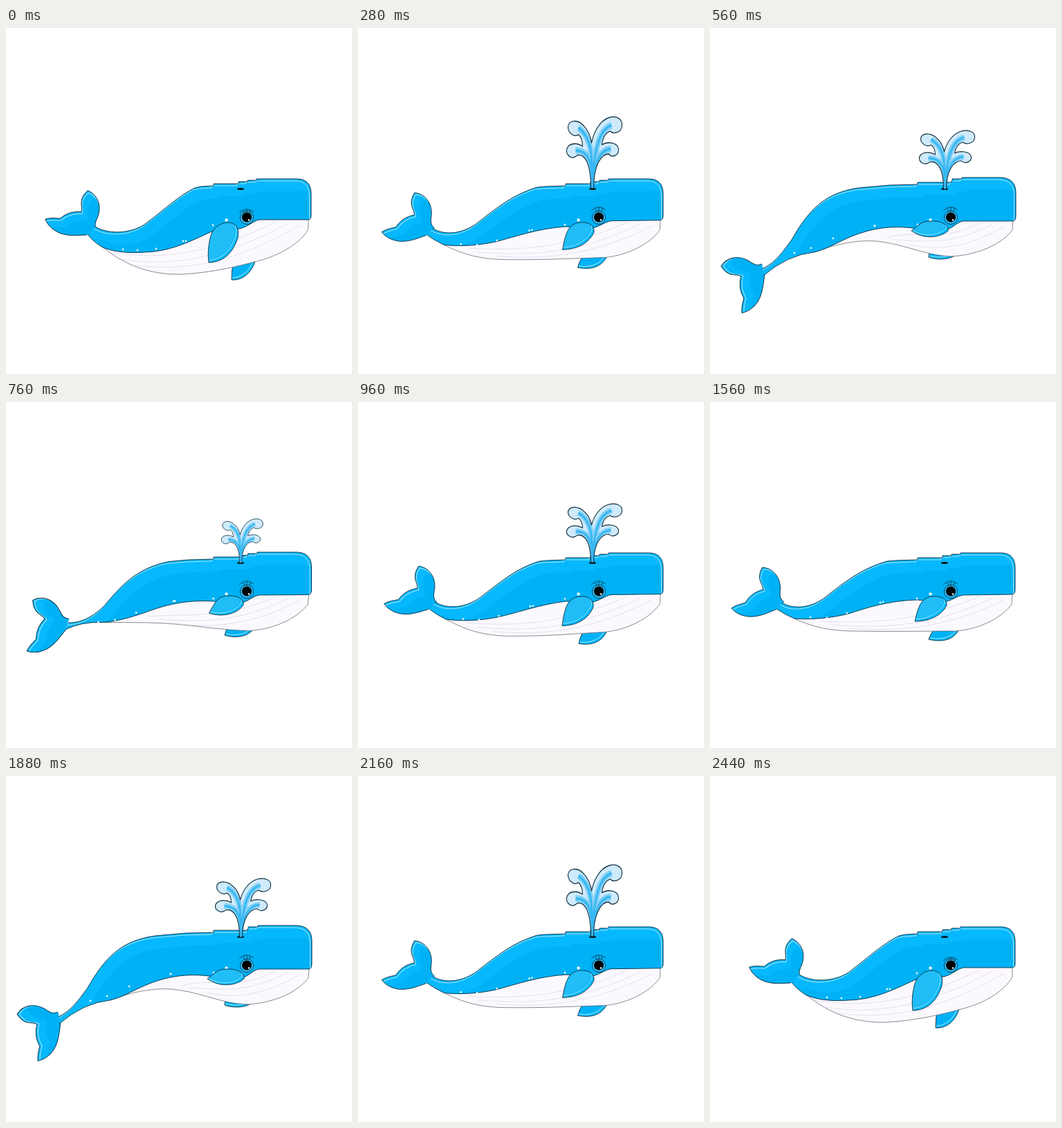
Recreate the animation shown at these times as an HTML page with a canvas. Size 500 by 500 pixels, loop 2480 ms.

```html
<!DOCTYPE html>
<html lang="en">
<head>
<meta charset="utf-8">
<title>Whale</title>
<style>
  html, body { margin: 0; height: 100%; overflow: hidden; background: #fff; }
  canvas { display: block; }
</style>
</head>
<body>
<canvas width="500" height="500"></canvas>
<script>
const ctx = document.querySelector('canvas').getContext('2d');
const INK = '#10303f', LIGHT = '#06b8fd', BLUE = '#00b1f6', GLOW = '#a5e6ff';
const STEP = 40, STEPS = 31;

// Every moving part has three poses: tail up, tail level, tail down.
const body = [
  'M129 287 C147 298 178 298 200 284 C228 263 250 242 273 231 L282 229 L300 228 L300 225 L336 225 L336 222 L349 222 L349 220 L362 220 L362 218 L420 218 Q441 218 441 240 L441 271 Q441 277 436 277 L366 277 C357 279 350 287 338 290 L300 293 C268 307 240 323 200 324 C175 326 152 323 138 316 Q124 307 118 298',
  'M104 290 C122 301 148 297 168 281 C195 260 218 241 256 230 L268 229 L300 228 L300 225 L336 225 L336 222 L349 222 L349 220 L362 220 L362 218 L420 218 Q441 218 441 240 L441 271 Q441 278 436 278 L366 279 C357 280 350 287 338 289 L300 286 C258 287 228 297 200 306 C175 312 150 315 122 313 Q108 307 96 299',
  'M76 348 C96 338 106 322 118 306 C142 264 165 238 215 231 L260 227 L300 226 L300 223 L349 223 L349 221 L350 221 L350 218 L364 218 L364 216 L420 216 Q442 217 442 238 L442 271 Q442 279 437 279 L366 279 C357 280 352 289 340 292 L300 290 C262 284 230 290 200 303 C180 312 165 321 150 324 Q112 328 77 358'
];
const belly = [
  'M135 313 C165 338 200 356 250 356 C300 354 340 343 370 335 C405 325 430 305 437 290 L437 277 L366 270 L300 285 L200 300 Z',
  'M122 313 C150 326 175 331 210 331 C265 332 310 331 355 331 C395 328 425 308 436 292 L437 277 L366 270 L300 275 L200 295 Z',
  'M150 324 C185 311 215 306 240 308 C285 313 310 329 350 330 C395 327 425 308 437 292 L438 277 L366 270 L300 278 L200 290 Z'
];
const grooves = [
  'M150 324 C215 335 290 330 390 280 M165 334 C240 345 310 335 408 282 M185 343 C260 352 330 340 425 285',
  'M160 317 C230 320 300 318 390 281 M175 322 C250 327 320 326 408 283 M200 327 C270 332 340 328 425 286',
  'M255 303 C300 290 330 312 390 282 M265 306 C310 308 345 315 408 284 M290 313 C330 322 370 318 425 287'
];
const nearFin = [
  'M320 281 C332 281 338 290 335 303 C328 325 315 338 293 339 C291 325 293 308 297 297 C302 287 310 282 320 281 Z',
  'M322 281 C334 280 343 285 342 294 C335 308 318 317 296 317 C299 305 301 296 306 289 C310 284 316 281 322 281 Z',
  'M322 279 C336 279 346 286 344 293 C336 301 312 308 291 293 C297 288 302 284 307 281 C312 279 316 279 322 279 Z'
];
const farFin = [
  'M328 340 Q326 352 326 364 C342 365 356 354 361 333',
  'M325 327 Q318 336 316 343 C332 347 352 346 360 328',
  'M319 318 Q316 327 316 331 C325 335 345 336 355 328'
];
const dots = [
  '169 320 190 321 217 319 256 308 260 308 299 285',
  '145 311 169 312 198 305 246 290 250 289 299 284',
  '122 325 146 318 178 304 238 286 238 286 300 284'
];
const tailPose = ['123 299 19', '101 298 0', '80 350.5 -61'];
const tail = new Path2D('M6 -9 C-1 -14 0 -20 .5 -28 C1 -44 -9 -58 -25.5 -59 C-29 -52 -31 -46 -28 -38 Q-25 -32 -24 -27 C-36 -24 -44 -18 -50 -8 C-56 -6 -63 -5 -70 0 C-62 10 -48 13 -38 12 C-26 11 -14 5 -6 2');

const water = new Path2D('M-2 0 C-2 -17 -4 -29 -11 -36 C-16 -41 -22 -40 -24 -38 C-30 -34 -38 -40 -37 -46 C-35 -54 -22 -55 -14 -50 C-14 -58 -17 -62 -20 -64 C-26 -60 -35 -66 -35 -73 C-34 -82 -20 -82 -12 -74 C-5 -68 -2 -60 -1 -54 C2 -66 10 -80 24 -84 C36 -87 44 -82 43 -74 C42 -66 30 -64 26 -68 C18 -66 15 -58 14 -52 C22 -56 36 -55 38 -47 C39 -39 28 -36 24 -41 C13 -41 2 -28 2 0 Z');
const streams = new Path2D('M0 0 C0 -30 -4 -45 -24 -45 M0 0 C0 -40 0 -60 -20 -72 M0 0 C2 -40 8 -70 28 -75 M0 0 C2 -30 11 -46 27 -47');
const spoutHeight = [0, .13, .42, .75, 1, 1.12, 1, 1.22];

function mixer(step) {
  const from = step < 8 ? 0 : 1;
  const w = from ? Math.min((step - 8) / 6, 1.1) : (step / 8) ** 1.2;
  return poses => {
    const next = poses[from + 1].match(/-?[\d.]+/g);
    let i = 0;
    return poses[from].replace(/-?[\d.]+/g, n => (n * (1 - w) + next[i++] * w).toFixed(2));
  };
}

function shape(path, fill, stroke, width = .9) {
  if (fill) { ctx.fillStyle = fill; ctx.fill(path); }
  if (stroke) { ctx.strokeStyle = stroke; ctx.lineWidth = width; ctx.stroke(path); }
}

function line(d, color, width) { shape(new Path2D(d), null, color, width); }

function disc(x, y, rx, fill, stroke, ry = rx) {
  const p = new Path2D();
  p.ellipse(x, y, rx, ry, 0, 0, 7);
  shape(p, fill, stroke);
}

// Filled shape with a shifted inner tone and a thin highlight.
function shaded(path, shadeX, shadeY, glowX, glowY, tone = BLUE) {
  shape(path, LIGHT);
  ctx.save();
  ctx.clip(path);
  ctx.translate(shadeX, shadeY);
  shape(path, tone);
  ctx.translate(glowX - shadeX, glowY - shadeY);
  shape(path, null, GLOW, 1);
  ctx.restore();
  shape(path, null, INK);
}

function eye(lid) {
  if (lid === 2) return line('M338 279 Q348 290 360 279', INK, 1);
  disc(348, 274, 9.6, '#2abaf2', INK);
  disc(348, 273.5, 7, '#000');
  disc(351, 277.5, 1.3, '#fff');
  ctx.save();
  ctx.translate(0, lid * 3);
  line('M337 264 Q347 254 358 263 M345 266 L343 261 M348 266 L348 259 M352 266 L353 260', INK, .8);
  ctx.restore();
}

function spout(size, shift) {
  if (!size) return;
  ctx.save();
  ctx.translate(338.5 + shift, 232 + shift);
  ctx.scale(Math.min(size, 1), size);
  shape(water, '#cfeafb');
  ctx.save();
  ctx.clip(water);
  shape(streams, null, '#84d0f6', 8);
  shape(streams, null, '#38b8f2', 3);
  ctx.restore();
  shape(water, null, INK, 1.1);
  ctx.restore();
}

function draw(now) {
  const frame = Math.floor(now / STEP) % STEPS;
  const step = frame < 16 ? frame : 30 - frame;
  const mix = mixer(step), path = poses => new Path2D(mix(poses));

  ctx.fillStyle = '#fff';
  ctx.fillRect(0, 0, 500, 500);
  ctx.lineJoin = 'round';

  shaded(path(farFin), -3, -3, -2, -3);

  const [x, y, angle] = mix(tailPose).split(' ').map(Number);
  ctx.save();
  ctx.translate(x, y);
  ctx.rotate(angle * Math.PI / 180);
  shaded(tail, 12, 10, 2, 2.5);
  ctx.restore();

  shape(path(belly), '#fcf9fe', '#555a62', .7);
  line(mix(grooves), '#dedae8', .8);
  shaded(path(body), 8, 18, -2.5, 3);

  const spots = mix(dots).split(' ');
  for (let i = 0; i < spots.length; i += 2) disc(+spots[i], +spots[i + 1], 1.4, '#e2f6ff');
  disc(318.5, 277.5, 2.3, '#e2f6ff');

  eye([1, 2, 2, 1][step] || 0);
  shaded(path(nearFin), -5, -4, -3, -3, '#20bdf7');
  disc(339, 232.5, 5, '#06161e', null, 1.5);
  spout(spoutHeight[step % 8], step > 8 ? (step - 8) / 6 : 0);
}

function loop(now) {
  draw(now);
  requestAnimationFrame(loop);
}
draw(0);
requestAnimationFrame(loop);
</script>
</body>
</html>
```
